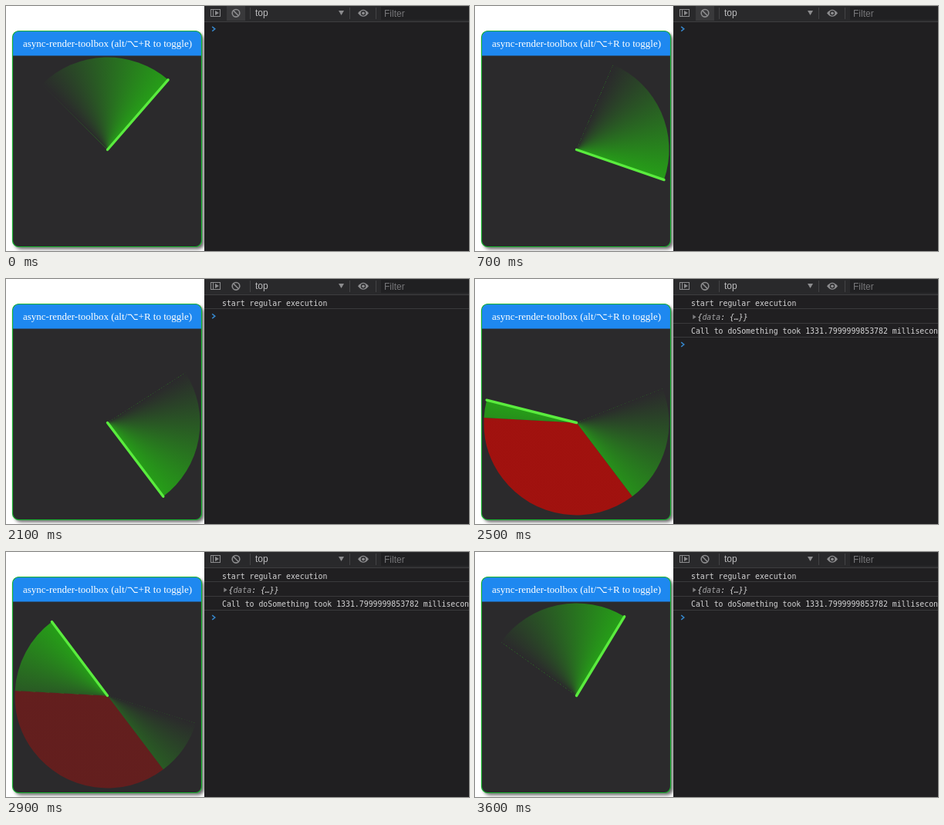
Recreate the animation shown at these times as an HTML page with a canvas. Size 600 px wide and 318 px high, loop 3700 ms.

```html
<!DOCTYPE html>
<html lang="en">
<head>
<meta charset="utf-8">
<title>async-render-toolbox</title>
<style>
  html, body { margin: 0; width: 100%; height: 100%; overflow: hidden; background: #fff; }
  canvas { display: block; width: 600px; height: 318px; }
</style>
</head>
<body>
<canvas id="stage" width="600" height="318"></canvas>
<script>
const ctx = document.getElementById('stage').getContext('2d');

const LOOP = 3700, STEP = 100;
const BLOCK_START = 1049, BLOCK_END = 2386;
const HOVER_END = 900;
const TRAIL = 880;
const CX = 131.5, CY = 186.5, R = 120;
const START_ANGLE = -49.1 * Math.PI / 180;
const GREEN = '38,158,24', RED = '178,14,10';
const SERIF = '"Liberation Serif", serif';
const SANS = '"Liberation Sans", sans-serif';
const MONO = '"DejaVu Sans Mono", monospace';
const ROW = 18.4, ROWS_TOP = 20.5;

const angleAt = t => START_ANGLE + t / LOOP * Math.PI * 2;

function rect(x, y, w, h, color) {
  ctx.fillStyle = color;
  ctx.fillRect(x, y, w, h);
}

function poly(points, color, open) {
  ctx.beginPath();
  points.forEach(([x, y]) => ctx.lineTo(x, y));
  if (open) {
    ctx.strokeStyle = color;
    ctx.stroke();
  } else {
    ctx.fillStyle = color;
    ctx.fill();
  }
}

function text(str, x, y, font, color, align = 'left') {
  ctx.font = font;
  ctx.fillStyle = color;
  ctx.textAlign = align;
  ctx.fillText(str, x, y);
  return ctx.measureText(str).width;
}

function panelPath() {
  ctx.beginPath();
  ctx.roundRect(8.5, 32.5, 245, 280, 8);
}

function drawPanel() {
  rect(0, 0, 257, 318, '#fff');
  ctx.save();
  ctx.shadowColor = 'rgba(0,0,0,.6)';
  ctx.shadowBlur = 4;
  ctx.shadowOffsetX = ctx.shadowOffsetY = 3;
  ctx.fillStyle = '#2b2a2c';
  panelPath();
  ctx.fill();
  ctx.restore();

  ctx.save();
  panelPath();
  ctx.clip();
  rect(8, 32, 246, 32.5, '#1e88f0');
  ctx.restore();
  ctx.strokeStyle = '#18b430';
  ctx.lineWidth = 1.2;
  panelPath();
  ctx.stroke();

  const font = '13px ' + SERIF;
  const left = 22 + text('async-render-toolbox (alt/', 22, 53, font, '#fff');
  const right = 241 - text('+R to toggle)', 241, 53, font, '#fff', 'right');
  text('⌥', (left + right) / 2, 53, '13px "DejaVu Sans", sans-serif', '#fff', 'center');
}

// Sector swept between two times, its opacity running from a0 to a1.
function sweep(t0, t1, rgb, a0, a1) {
  const from = angleAt(t0), to = angleAt(t1);
  const grad = ctx.createConicGradient(from, CX, CY);
  const span = (t1 - t0) / LOOP;
  grad.addColorStop(0, `rgba(${rgb},${a0})`);
  grad.addColorStop(span, `rgba(${rgb},${a1})`);
  grad.addColorStop(Math.min(1, span + 0.02), `rgba(${rgb},${a1})`);
  ctx.fillStyle = grad;
  ctx.beginPath();
  ctx.moveTo(CX, CY);
  ctx.arc(CX, CY, R, from, to);
  ctx.fill();
}

function drawRadar(t) {
  const head = t > BLOCK_START && t < BLOCK_END ? BLOCK_START : t;
  const since = t - BLOCK_END;
  if (since >= 0 && since < TRAIL) {
    const left = 1 - since / TRAIL;
    sweep(BLOCK_START - TRAIL * left, BLOCK_START, GREEN, 0, left);
    sweep(BLOCK_START, BLOCK_END, RED, left, left);
    sweep(BLOCK_END, t, GREEN, left, 1);
  } else {
    sweep(head - TRAIL, head, GREEN, 0, 1);
  }

  const a = angleAt(head);
  ctx.lineWidth = 3.4;
  ctx.lineCap = 'round';
  poly([[CX, CY], [CX + R * Math.cos(a), CY + R * Math.sin(a)]], '#5aec3e', true);
  ctx.lineCap = 'butt';
}

function drawToolbar(hover) {
  const icon = '#8c8c8e';
  rect(257, 0, 343, 20, '#29292b');
  if (hover) rect(286, 0, 24, 19, '#39393b');
  rect(257, 20, 343, 1, '#3e3e40');

  ctx.strokeStyle = icon;
  ctx.lineWidth = 1;
  ctx.strokeRect(265.5, 4.5, 12, 9);
  rect(268, 4, 1, 10, icon);
  poly([[271, 6], [276, 9], [271, 12]], icon);

  ctx.lineWidth = 1.6;
  ctx.beginPath();
  ctx.arc(298, 9.3, 4.8, 0, Math.PI * 2);
  ctx.stroke();
  poly([[294.6, 5.9], [301.4, 12.7]], icon, true);

  for (const x of [316, 445, 479]) rect(x, 2, 1, 15, '#434345');
  text('top', 323, 13, '12px ' + SANS, '#bcbcbe');
  poly([[431, 6], [438, 6], [434.5, 12]], icon);

  ctx.fillStyle = icon;
  ctx.beginPath();
  ctx.moveTo(456, 9.3);
  ctx.quadraticCurveTo(463, 0.2, 470, 9.3);
  ctx.quadraticCurveTo(463, 18.4, 456, 9.3);
  ctx.fill();
  for (const [r, color] of [[3.2, '#29292b'], [1.9, icon]]) {
    ctx.fillStyle = color;
    ctx.beginPath();
    ctx.arc(463, 9.3, r, 0, Math.PI * 2);
    ctx.fill();
  }

  rect(486, 1, 114, 17, '#202022');
  text('Filter', 490, 14, '12px ' + SANS, '#77777a');
}

function drawConsole(t) {
  const font = '9.85px ' + MONO, white = '#d5d5d6';
  rect(257, 0, 343, 318, '#201f21');
  drawToolbar(t < HOVER_END);

  const rows = t < BLOCK_START ? 0 : t < BLOCK_END ? 1 : 3;
  for (let i = 1; i <= rows; i++) {
    rect(257, Math.floor(ROWS_TOP + i * ROW), 343, 1, '#3a3a3c');
  }
  if (rows > 0) text('start regular execution', 280, 34.5, font, white);
  if (rows > 1) {
    poly([[282.3, 46.2], [286.6, 49.2], [282.3, 52.2]], '#808082');
    let x = 288.5;
    for (const [part, color] of [['{', white], ['data', '#a2a2a4'], [': {…}}', white]]) {
      x += text(part, x, 52.5, 'italic ' + font, color);
    }
    text('Call to doSomething took 1331.7999999853782 milliseconds', 280, 71.3, font, white);
  }

  const y = ROWS_TOP + rows * ROW + 9.3;
  ctx.lineWidth = 1.5;
  poly([[267.2, y - 2.9], [270.8, y], [267.2, y + 2.9]], '#3687cc', true);
}

function draw(t) {
  drawPanel();
  drawRadar(t);
  drawConsole(t);
}

const began = performance.now();
function tick() {
  const t = (performance.now() - began) % LOOP;
  draw(Math.floor(t / STEP) * STEP);
  requestAnimationFrame(tick);
}
tick();
</script>
</body>
</html>
```
